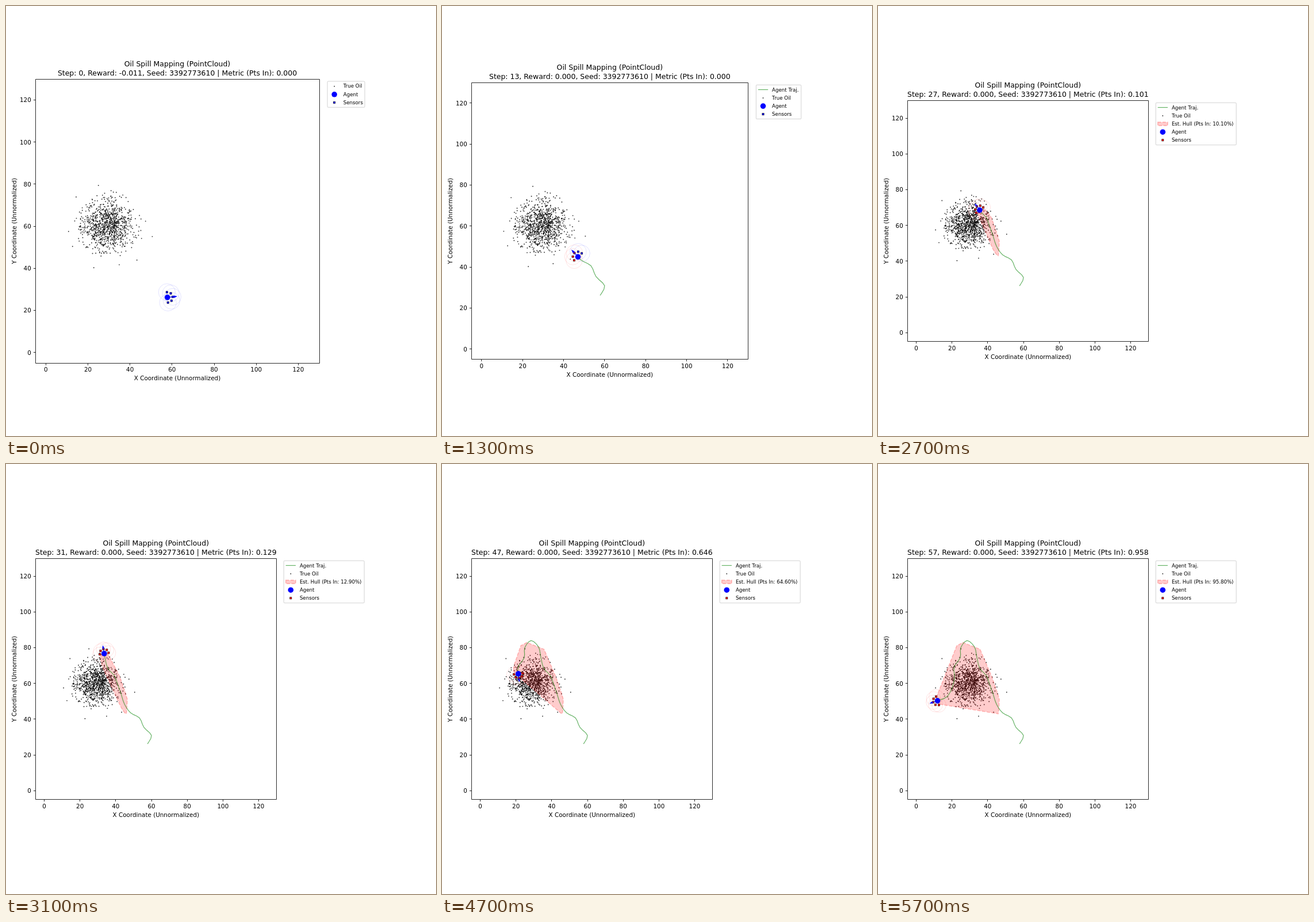
Animation, 748 px wide and 748 px high, one loop 5800 ms. Source, as an HTML page with a canvas:

```html
<!DOCTYPE html>
<html lang="en">
<head>
<meta charset="utf-8">
<title>Oil Spill Mapping</title>
<style>
  html, body { margin: 0; width: 100%; height: 100%; overflow: hidden; background: #fff; }
  canvas { display: block; }
</style>
</head>
<body>
<canvas id="stage" width="748" height="748"></canvas>
<script>
const ctx = document.getElementById('stage').getContext('2d');
const STEP_MS = 100, LAST = 57, KEY_EVERY = 3;
const LEFT = 51, MID_Y = 374, LOW = -5, SPAN = 135;
const SENSOR_DIST = 2.5, SENSOR_RANGE = 4;
const PT = 748 / 720;
const TITLE = 12 * PT, LABEL = 10 * PT, SMALL = 8.33 * PT;
const FONT = '"DejaVu Sans", sans-serif';
const TRAIL = 'rgba(0,128,0,.6)';

// Turning points of the agent's route, one for every third step
const route = [
  [57.8, 26.2], [60, 30.9], [55.8, 35.4], [53.3, 40.7], [48.3, 43.6], [44.9, 48.4], [43, 54.1],
  [41.1, 59.5], [39.2, 64.4], [35.5, 68.6], [33.9, 74.7], [32.6, 80.5], [28.4, 84], [24.9, 80],
  [24.6, 74.4], [21.2, 69.3], [21.4, 63.5], [20.2, 58], [17.2, 52.6], [11.9, 50.3]
];

// Drops far out at the rim of the cloud
const strays = [
  [25, 79.4], [31, 76.9], [33.5, 76.1], [14.4, 73.9], [10.8, 57.5], [12.7, 50.4],
  [22.8, 40.3], [34.9, 41.7], [43.3, 43.9], [50.6, 55.1], [45.5, 54.2], [47.4, 62.4]
];

// Share of drops inside the hull: [step, share]
const metricKeys = [[0, 0], [13, 0], [22, .033], [31, .129], [40, .25], [47, .646], [57, .958]];

function routeAt(step) {
  const k = Math.min(Math.floor(step / KEY_EVERY), route.length - 2);
  const t = step / KEY_EVERY - k;
  const key = i => route[Math.max(0, Math.min(route.length - 1, i))];
  const [a, b, c, d] = [-1, 0, 1, 2].map(j => key(k + j));
  return [0, 1].map(n => b[n] + t / 2 * (c[n] - a[n] +
    t * (2 * a[n] - 5 * b[n] + 4 * c[n] - d[n] + t * (3 * (b[n] - c[n]) + d[n] - a[n]))));
}

function seeded(seed) {
  return () => {
    seed = (seed + 0x6D2B79F5) | 0;
    let t = Math.imul(seed ^ (seed >>> 15), 1 | seed);
    t = (t + Math.imul(t ^ (t >>> 7), 61 | t)) ^ t;
    return ((t ^ (t >>> 14)) >>> 0) / 4294967296;
  };
}

function makeOil() {
  const rand = seeded(42), oil = [...strays];
  while (oil.length < 1000) {
    const r = Math.sqrt(-2 * Math.log(1 - rand())), a = rand() * 2 * Math.PI;
    if (r < 2.6) oil.push([29.5 + 6.2 * r * Math.cos(a), 60.5 + 6.2 * r * Math.sin(a)]);
  }
  return oil;
}

const cross = (o, a, b) => (a[0] - o[0]) * (b[1] - o[1]) - (a[1] - o[1]) * (b[0] - o[0]);

function convexHull(points) {
  if (points.length < 3) return [];
  const sorted = [...points].sort((a, b) => a[0] - b[0] || a[1] - b[1]);
  const chain = list => {
    const out = [];
    for (const p of list) {
      while (out.length > 1 && cross(out.at(-2), out.at(-1), p) <= 0) out.pop();
      out.push(p);
    }
    return out.slice(0, -1);
  };
  return [...chain(sorted), ...chain(sorted.reverse())];
}

const inside = (hull, p) =>
  hull.length > 2 && hull.every((a, i) => cross(a, hull[(i + 1) % hull.length], p) >= 0);

const path = Array.from({ length: LAST + 1 }, (_, i) => routeAt(i));
const oil = makeOil();

// Each hull holds the detections of all earlier steps
const hits = [];
const steps = path.map(([x, y], i) => {
  const heading = i ? Math.atan2(y - path[i - 1][1], x - path[i - 1][0]) : 0.1;
  const hull = convexHull(hits);
  const sensors = [-2, -1, 0, 1, 2].map(k => {
    const a = heading + k * Math.PI / 4;
    const pos = [x + SENSOR_DIST * Math.cos(a), y + SENSOR_DIST * Math.sin(a)];
    const hit = oil.some(p => Math.hypot(p[0] - pos[0], p[1] - pos[1]) < SENSOR_RANGE);
    return { pos, hit };
  });
  hits.push(...sensors.filter(s => s.hit).map(s => s.pos));
  return { pos: [x, y], heading, hull, sensors, count: oil.filter(p => inside(hull, p)).length };
});

// Between keys the metric follows the drops that the hull really takes in
steps.forEach((s, i) => {
  const k = Math.max(1, metricKeys.findIndex(m => m[0] >= i));
  const [i0, m0] = metricKeys[k - 1], [i1, m1] = metricKeys[k];
  const c0 = steps[i0].count, c1 = steps[i1].count;
  const part = c1 > c0 ? (s.count - c0) / (c1 - c0) : (i - i0) / (i1 - i0);
  s.metric = Math.round((m0 + (m1 - m0) * part) * 1000) / 1000;
});

function text(str, x, y, size, align = 'left') {
  ctx.font = `${size}px ${FONT}`;
  ctx.textAlign = align;
  ctx.fillStyle = '#000';
  ctx.fillText(str, x, y);
}

function line(points, color, width, close = false) {
  ctx.beginPath();
  points.forEach(p => ctx.lineTo(p[0], p[1]));
  if (close) ctx.closePath();
  ctx.strokeStyle = color;
  ctx.lineWidth = width;
  ctx.stroke();
}

function disc(x, y, r, color) {
  ctx.beginPath();
  ctx.arc(x, y, r, 0, 2 * Math.PI);
  ctx.fillStyle = color;
  ctx.fill();
}

function square(x, y, hit) {
  ctx.fillStyle = hit ? '#f00' : '#00f';
  ctx.fillRect(x - 1.6, y - 1.6, 3.2, 3.2);
  ctx.strokeStyle = 'rgba(0,0,0,.85)';
  ctx.lineWidth = .7;
  ctx.strokeRect(x - 1.6, y - 1.6, 3.2, 3.2);
}

function hullShape(points) {
  ctx.setLineDash([5.8, 2.5]);
  line(points, 'rgba(255,0,0,.24)', 1.5 * PT, true);
  ctx.setLineDash([]);
  ctx.fillStyle = 'rgba(255,0,0,.2)';
  ctx.fill();
}

const oilDot = (x, y) => disc(x, y, .95, 'rgba(0,0,0,.78)');
const agentDot = (x, y) => disc(x, y, 4.8, '#00f');
const crisp = v => Math.floor(v) + .5;

function drawArrow([x, y], heading, scale) {
  ctx.save();
  ctx.translate(x, y);
  ctx.rotate(-heading);
  ctx.scale(scale, scale);
  line([[0, 0], [3, 0]], '#00f', .3);
  line([[3, -.5], [4.5, 0], [3, .5]], '#00f', .2, true);
  ctx.fillStyle = '#00f';
  ctx.fill();
  ctx.restore();
}

function drawAxes(size, top, scale) {
  const bottom = top + size, right = LEFT + size, mid = LEFT + size / 2;
  const [x0, x1, y0, y1] = [LEFT, right, top, bottom].map(crisp);
  line([[x0, y0], [x1, y0], [x1, y1], [x0, y1]], '#000', .8 * PT, true);
  for (let v = 0; v <= 120; v += 20) {
    const x = LEFT + (v - LOW) * scale, y = bottom - (v - LOW) * scale;
    line([[crisp(x), y1], [crisp(x), y1 + 3.5 * PT]], '#000', .8 * PT);
    line([[x0, crisp(y)], [x0 - 3.5 * PT, crisp(y)]], '#000', .8 * PT);
    text(v, x, bottom + 15, LABEL, 'center');
    text(v, LEFT - 7 * PT, y + 3.8, LABEL, 'right');
  }
  text('X Coordinate (Unnormalized)', mid, bottom + 30, LABEL, 'center');
  ctx.save();
  ctx.translate(17.5, MID_Y);
  ctx.rotate(-Math.PI / 2);
  text('Y Coordinate (Unnormalized)', 0, 0, LABEL, 'center');
  ctx.restore();
}

function drawLegend(rows, x, top, width) {
  ctx.beginPath();
  ctx.roundRect(x, top, width, 14.1 * rows.length + 3, 1.7);
  ctx.strokeStyle = '#d4d4d4';
  ctx.lineWidth = PT;
  ctx.stroke();
  rows.forEach(([label, mark], i) => {
    const y = top + 8.4 + 14.1 * i;
    mark(x + 1.4 * SMALL, y + .3);
    text(label, x + 3.2 * SMALL, y + 3, SMALL);
  });
}

function draw(index) {
  const { pos, heading, hull, sensors, metric } = steps[index];
  const hasHull = hull.length > 2;
  const wide = metric >= .1;
  // The plot shrinks as the legend beside it grows
  const size = !index ? 494 : !hasHull ? 481.6 : wide ? 419.6 : 425.2;
  const boxWidth = !index ? 65 : !hasHull ? 78.3 : wide ? 140 : 134.5;
  const top = MID_Y - size / 2, scale = size / SPAN;
  const at = ([x, y]) => [LEFT + (x - LOW) * scale, top + size - (y - LOW) * scale];

  ctx.fillStyle = '#fff';
  ctx.fillRect(0, 0, 748, 748);

  oil.forEach(p => oilDot(...at(p)));
  if (hasHull) hullShape(hull.map(at));
  sensors.forEach(s => {
    ctx.beginPath();
    ctx.arc(...at(s.pos), SENSOR_RANGE * scale, 0, 2 * Math.PI);
    ctx.strokeStyle = s.hit ? 'rgba(255,0,0,.14)' : 'rgba(0,0,255,.14)';
    ctx.lineWidth = .8;
    ctx.stroke();
  });
  if (index) line(path.slice(0, index + 1).map(at), TRAIL, 1.2);
  sensors.forEach(s => square(...at(s.pos), s.hit));
  drawArrow(at(pos), heading, scale);
  agentDot(...at(pos));

  drawAxes(size, top, scale);

  const mid = LEFT + size / 2, reward = index ? '0.000' : '-0.011';
  text('Oil Spill Mapping (PointCloud)', mid, top - 22, TITLE, 'center');
  text(`Step: ${index}, Reward: ${reward}, Seed: 3392773610 | Metric (Pts In): ${metric.toFixed(3)}`,
    mid, top - 6.2, TITLE, 'center');

  const rows = [
    ['True Oil', oilDot],
    ['Agent', agentDot],
    ['Sensors', (x, y) => square(x, y, sensors[0].hit)]
  ];
  if (hasHull) rows.splice(1, 0, [`Est. Hull (Pts In: ${(metric * 100).toFixed(2)}%)`, (x, y) =>
    hullShape([[x - SMALL, y - 3], [x + SMALL, y - 3], [x + SMALL, y + 3], [x - SMALL, y + 3]])]);
  if (index) rows.unshift(['Agent Traj.', (x, y) =>
    line([[x - SMALL, crisp(y)], [x + SMALL, crisp(y)]], TRAIL, 1.2)]);
  drawLegend(rows, LEFT + size * 1.02 + 4.2, top + 4, boxWidth);
}

function tick() {
  draw(Math.floor(performance.now() / STEP_MS) % steps.length);
  requestAnimationFrame(tick);
}
tick();
</script>
</body>
</html>
```
